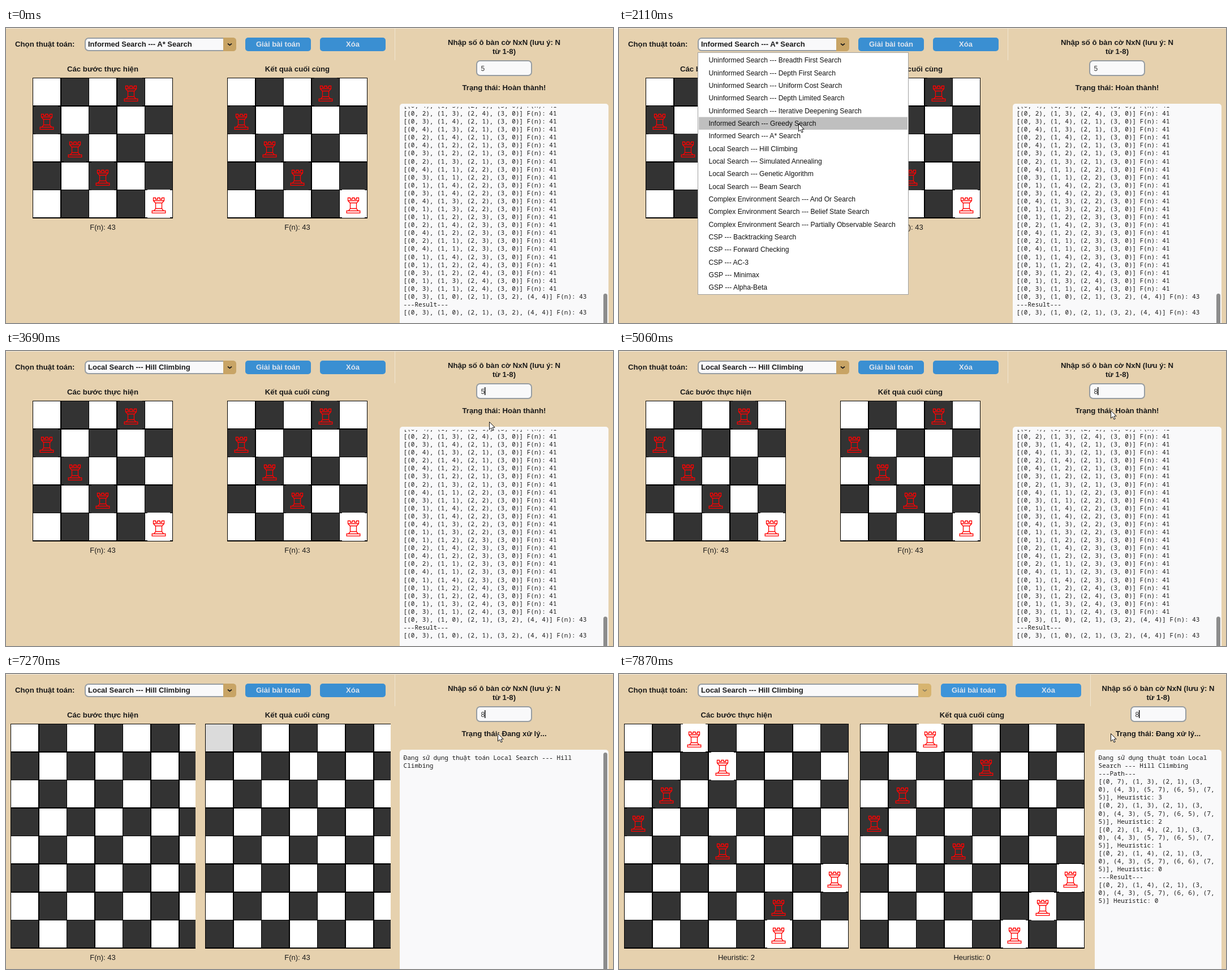
These frames come from a looping animation (1073 by 522 pixels, 8 s). An HTML page:

```html
<!DOCTYPE html>
<html lang="vi">
<head>
<meta charset="utf-8">
<title>Rooks search demo</title>
<style>
  html, body { margin: 0; width: 100%; height: 100%; overflow: hidden; background: #e6d1ae; }
  svg { display: block; width: 100%; height: 100%; }
  text { font: 13px "Liberation Sans", Arial, sans-serif; fill: #1a1a1a; white-space: pre; }
  .label { font-weight: bold; font-size: 13.2px; }
  .value { font-weight: bold; }
  .button { font-weight: bold; fill: #dce4ee; }
  .item { font-size: 12.13px; fill: #111; }
  .entry { font-size: 12px; fill: #333; }
  .log { font: 11.02px "Noto Sans Mono", "DejaVu Sans Mono", monospace; }
  .mid { text-anchor: middle; }
  .rook { fill: none; stroke: #f00; stroke-width: 1.3; }
</style>
</head>
<body>
<svg id="stage" viewBox="0 0 1073 522" preserveAspectRatio="none"></svg>
<script>
const LOOP = 8000, TICK = 1000 / 15, CELL = 49.6, LINE = 14.08;

const MENU = [
  ...['Breadth First', 'Depth First', 'Uniform Cost', 'Depth Limited', 'Iterative Deepening']
    .map(s => `Uninformed Search --- ${s} Search`),
  'Informed Search --- Greedy Search', 'Informed Search --- A* Search',
  'Local Search --- Hill Climbing', 'Local Search --- Simulated Annealing',
  'Local Search --- Genetic Algorithm', 'Local Search --- Beam Search',
  ...['And Or', 'Belief State', 'Partially Observable']
    .map(s => `Complex Environment Search --- ${s} Search`),
  'CSP --- Backtracking Search', 'CSP --- Forward Checking', 'CSP --- AC-3',
  'GSP --- Minimax', 'GSP --- Alpha-Beta'
];

// A placement is a string of columns, one digit per row.
const pairs = cols => '[' + [...cols].map((c, r) => `(${r}, ${c})`).join(', ') + ']';
const wrapped = cols => pairs(cols).replace(/\((3|7), /g, '($1,\n');

const OPEN_ROWS = ('234 341 431 241 421 321 231 412 312 142 342 432 ' +
  '132 123 243 423 213 413 143 124 324 134 314').split(' ');
const ASTAR = pairs('30124') + ' F(n): 43';
const ASTAR_LOG = ['431', ...OPEN_ROWS].map(c => pairs(c + '0') + ' F(n): 41')
  .concat(ASTAR, '---Result---', ASTAR);

const STEPS = ['73103755', '23103755', '24103755', '24103765'];
const START_LOG = ['Đang sử dụng thuật toán Local Search --- Hill', 'Climbing'];
const HILL_LOG = [
  'Đang sử dụng thuật toán Local\nSearch --- Hill Climbing\n---Path---',
  ...STEPS.map((cols, i) => `${wrapped(cols)}, Heuristic: ${3 - i}`),
  '---Result---', wrapped(STEPS[3]) + ' Heuristic: 0'
].join('\n').split('\n');

// Pointer path: time, x, y
const PATH = [
  [130, 829, 372], [700, 338, 120], [890, 387, 43], [960, 390, 33],
  [1700, 390, 33], [2320, 297, 207], [3000, 297, 207],
  [3760, 878, 121], [3830, 878, 119], [4100, 869, 105], [LOOP, 869, 105]
];

function pointerAt(t) {
  const time = Math.round(t / TICK) * TICK;
  const i = Math.max(1, PATH.findIndex(k => k[0] >= time));
  const [a, b] = [PATH[i - 1], PATH[i]];
  const u = Math.min(1, Math.max(0, (time - a[0]) / (b[0] - a[0])));
  const e = u * u * (3 - 2 * u);
  return [1, 2].map(k => Math.round(a[k] + (b[k] - a[k]) * e));
}

const text = (x, y, s, cls = '') => `<text x="${x}" y="${y}" class="${cls}">${s}</text>`;
const rect = (x, y, w, h, fill, r = 0, extra = '') =>
  `<rect x="${x}" y="${y}" width="${w}" height="${h}" fill="${fill}" rx="${r}" ${extra}/>`;
const path = (d, extra) => `<path d="${d}" ${extra}/>`;
const field = (x, y, w, h) =>
  rect(x + 1, y + 1, w - 2, h - 2, '#f9f9fa', 6, 'stroke="#979da2" stroke-width="2"');

const ROOK = 'M-9.5-12V-7L-6-3H6L9.5-7V-12H5.5V-9.5H2V-12H-2V-9.5H-5.5V-12ZM-9.5-7H9.5' +
  'M-5.5-3V7M5.5-3V7M-5.5 7H5.5L8.5 11H-8.5ZM-11.8 14.8V11H11.8V14.8Z';

function board(x0, n, cols, clipRight, firstCell) {
  const y0 = 88, at = (o, i) => Math.round(o + i * CELL);
  const shade = (r, c) => (r + c) % 2 ? '#333' : '#fff';
  const width = Math.min(n * CELL, clipRight - x0);
  let s = rect(x0, y0, Math.round(width), Math.round(n * CELL) + 1, '#000');
  for (let r = 0; r < n; r++) for (let c = 0; c < n; c++) {
    const x = at(x0, c), w = Math.min(48, clipRight - x - 1);
    if (w > 0) s += rect(x + 1, at(y0, r) + 1, w, 48, !r && !c && firstCell || shade(r, c));
  }
  [...cols].forEach((c, r) => {
    const x = at(x0, +c), y = at(y0, r);
    s += rect(x + 5, y, 40, 50, shade(r, +c)) +
      `<path class="rook" d="${ROOK}" transform="translate(${x + 25} ${y + 26.5})"/>`;
  });
  return s;
}

function log(x, lines, baseline) {
  return rect(x, 134, 1065 - x, 400, '#f9f9fa', 5) + '<g clip-path="url(#logClip)">' +
    lines.map((l, i) => text(x + 6.6, Math.round(baseline + i * LINE), l, 'log')).join('') + '</g>';
}

function caretOn(t) {
  if (t < 1290) return false;
  return t < 4920 ? Math.max(0, t - 1350) % 900 < 600 : t < 4990 || (t - 4990) % 930 < 600;
}

function draw(t) {
  const wide = t >= 7400, solved = t >= 7600, big = t >= 7190, running = t >= 7040;
  const shift = wide ? 146 : 0, edge = 687 + shift, side = wide ? 953 : 880.5;
  const menuOpen = t >= 1280 && t < 3060;
  const clicked = t >= 1280 && t < 1350 || t >= 2990 && t < 3060;
  const [px, py] = pointerAt(t);
  const hover = t >= 950 && t < 1750;
  const n = big ? 8 : 5;
  let s = '<clipPath id="logClip"><rect x="690" y="139.5" width="380" height="383"/></clipPath>';

  // Panels
  s += rect(0, 0, 1073, 522, '#e6d1ae') + rect(0, 0, 1073, 1, '#f3ebdd') +
    rect(edge, 0, 1, 57, '#f1e6d2');

  // Toolbar
  const comboEnd = wide ? 552 : 407, arrow = comboEnd - 11.5;
  const buttonFill = wide ? '#d7b46f' : hover ? '#b18a6b' : '#c8a465';
  s += text(16, 33, 'Chọn thuật toán:', 'label') + field(139, 17, comboEnd - 139, 24) +
    path(`M${comboEnd - 23} 17h17q6 0 6 6v12q0 6-6 6h-17z`, `fill="${buttonFill}"`) +
    path(`M${arrow - 3} 28l3 2.5l3-2.5`,
      `fill="none" stroke="${wide ? '#8d8060' : '#1a1a1a'}" stroke-width="1.7" stroke-linecap="round"`) +
    text(145, 33, MENU[t < 2990 ? 6 : 7], 'value');
  [['Giải bài toán', 423], ['Xóa', 555]].forEach(([name, x]) => {
    s += rect(x + shift, 17, 116, 24, wide ? '#3d94d9' : '#3a8fd2', 5) +
      text(x + shift + 58, 33, name, 'button mid');
  });

  // Boards
  const centers = wide ? [207.5, 624] : [171, 515];
  const lefts = wide ? [9, 426] : big ? [8, 352] : [47, 391];
  const clips = big && !wide ? [335, 680] : [999, 999];
  const small = big ? '' : '30124';
  const placed = solved ? [STEPS[t < 7860 ? 0 : 1], STEPS[3]] : [small, small];
  const scores = solved ? [t < 7860 ? 3 : 2, 0].map(v => 'Heuristic: ' + v) : ['F(n): 43', 'F(n): 43'];
  const gray = big && t < 7335 ? '#dbdbdb' : '';
  ['Các bước thực hiện', 'Kết quả cuối cùng'].forEach((title, i) => {
    s += text(centers[i], 77, title, 'label mid') +
      board(lefts[i], n, placed[i], clips[i], i ? gray : '') +
      text(centers[i], big ? 506 : 357, scores[i], 'mid');
  });

  // Side panel
  const typed = t < 4980 ? '5' : t < 5050 ? '' : '8';
  const entry = wide ? 904 : 831;
  s += text(side, 30, 'Nhập số ô bàn cờ NxN (lưu ý: N', 'label mid') +
    text(side, 46, 'từ 1-8)', 'label mid') + field(entry, 57, 99, 28) +
    text(entry + 8.5, 76, typed, 'entry');
  if (caretOn(t)) s += rect(entry + (typed ? 15 : 8.5), 64, 1.4, 14, '#000');
  s += text(side, 110, 'Trạng thái: ' + (running ? 'Đang xử lý...' : 'Hoàn thành!'), 'label mid');
  s += solved ? log(841, HILL_LOG, 152)
    : running ? log(696 + (wide ? 145 : 0), START_LOG, 152) : log(696, ASTAR_LOG, 141);
  if (!solved) {
    const top = t >= 7110 ? 139 : 470;
    s += rect(1056, top, 7, 540 - top, '#8c8c8c', 3.5);
  }

  // Dropdown
  if (menuOpen) {
    s += rect(139.5, 43.5, 372, 428, '#fff', 0, 'stroke="#a0a0a0"');
    const active = px < 384 && t < 2990 ? Math.floor((py - 45.8) / 22.35) : -1;
    if (active >= 0) s += rect(141, 45.8 + active * 22.35, 369, 22.35, '#bfbfbf');
    MENU.forEach((name, i) => s += text(158.5, (61.2 + i * 22.34).toFixed(1), name, 'item'));
  }

  // Pointer
  if (clicked) s += `<circle cx="${px}" cy="${py + 3}" r="10" fill="#f5cd1e" opacity=".75"/>`;
  if (t >= 130) s += path(`M${px + .5} ${py + .5}v13.5l3.2-3l2.3 5l2.2-1l-2.2-4.8h4.2z`,
    'fill="#fff" stroke="#111" stroke-width="1"');
  return s;
}

const stage = document.getElementById('stage');
const start = performance.now();
let shown = '';
function frame() {
  const next = draw((performance.now() - start) % LOOP);
  if (next !== shown) stage.innerHTML = shown = next;
  requestAnimationFrame(frame);
}
frame();
</script>
</body>
</html>
```
